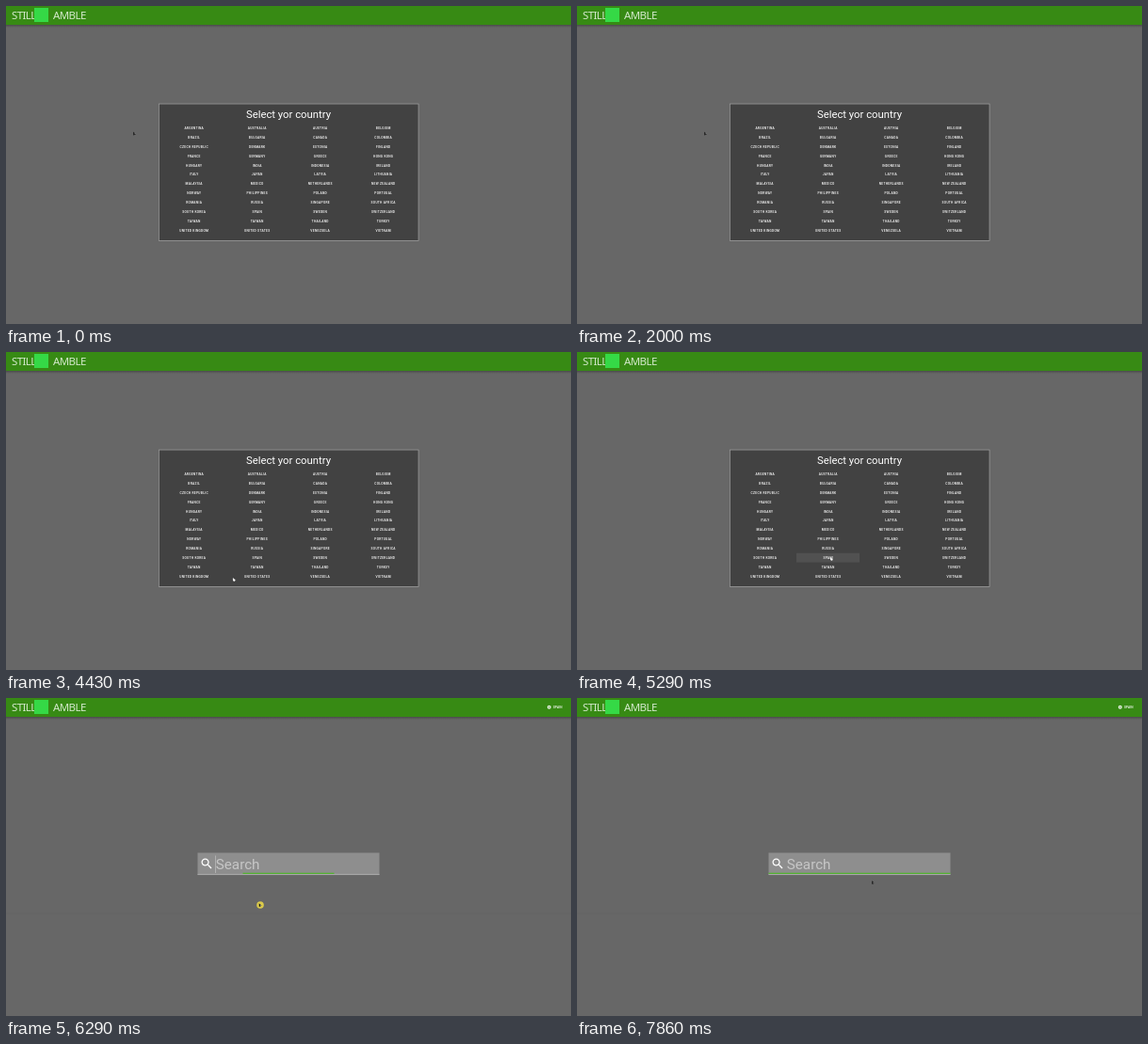
Write an HTML page with a canvas that moves like this. It is 600 by 338 pixels and loops after 8 s.

```html
<!DOCTYPE html>
<html lang="en">
<head>
<meta charset="utf-8">
<title>Country picker and search</title>
<style>
html, body { margin: 0; width: 100%; height: 100%; overflow: hidden; background: #666; }
canvas { display: block; width: 600px; height: 338px; }
</style>
</head>
<body>
<canvas id="stage" width="600" height="338"></canvas>
<script>
const ctx = document.getElementById('stage').getContext('2d');
const LOOP = 8000, FPS = 7;
const SWITCH = 6285;
const ROW_H = 9.86, COL_W = 67;

const countries = `ARGENTINA,AUSTRALIA,AUSTRIA,BELGIUM,BRAZIL,BULGARIA,CANADA,COLOMBIA,
CZECH REPUBLIC,DENMARK,ESTONIA,FINLAND,FRANCE,GERMANY,GREECE,HONG KONG,
HUNGARY,INDIA,INDONESIA,IRELAND,ITALY,JAPAN,LATVIA,LITHUANIA,
MALAYSIA,MEXICO,NETHERLANDS,NEW ZEALAND,NORWAY,PHILIPPINES,POLAND,PORTUGAL,
ROMANIA,RUSSIA,SINGAPORE,SOUTH AFRICA,SOUTH KOREA,SPAIN,SWEDEN,SWITZERLAND,
TAIWAN,TAIWAN,THAILAND,TURKEY,UNITED KINGDOM,UNITED STATES,VENEZUELA,VIETNAM`
  .split(',').map(s => s.trim());

// Pointer path: time, x, y
const path = [
  [0, 136.5, 135.5], [3570, 136.5, 135.5], [3860, 172, 190], [4140, 220, 252],
  [4430, 242, 242], [4710, 258, 229], [5000, 270, 220], [6290, 270, 220],
  [6570, 292, 207], [7000, 314.5, 196], [LOOP, 314.5, 196]
];

const searchIcon = new Path2D('M15.5 14h-.79l-.28-.27C15.41 12.59 16 11.11 16 9.5 16 5.91 13.09 3 9.5 3S3 5.91 3 9.5 5.91 16 9.5 16c1.61 0 3.09-.59 4.23-1.57l.27.28v.79l5 4.99L20.49 19l-4.99-5zm-6 0C7.01 14 5 11.99 5 9.5S7.01 5 9.5 5 14 7.01 14 9.5 11.99 14 9.5 14z');

const clamp = v => Math.max(0, Math.min(1, v));
const smooth = v => v * v * (3 - 2 * v);

function rect(x, y, w, h, color) {
  ctx.fillStyle = color;
  ctx.fillRect(x, y, w, h);
}

function disc(x, y, r, color) {
  ctx.fillStyle = color;
  ctx.beginPath();
  ctx.arc(x, y, r, 0, Math.PI * 2);
  ctx.fill();
}

function text(str, x, y, font, color, align = 'left', spacing = 0) {
  ctx.font = font;
  ctx.letterSpacing = spacing + 'px';
  ctx.textAlign = align;
  ctx.fillStyle = color;
  ctx.fillText(str, x, y);
}

function pointerAt(t) {
  const i = Math.max(1, path.findIndex(p => p[0] > t));
  const [t0, x0, y0] = path[i - 1], [t1, x1, y1] = path[i];
  const k = (t - t0) / (t1 - t0);
  return [x0 + (x1 - x0) * k, y0 + (y1 - y0) * k];
}

function header(picked) {
  const shade = ctx.createLinearGradient(0, 20, 0, 23);
  shade.addColorStop(0, 'rgba(0,0,0,.28)');
  shade.addColorStop(1, 'rgba(0,0,0,0)');
  rect(0, 20, 600, 3, shade);
  rect(0, 0, 600, 20, '#378a14');
  const font = "200 extra-condensed 11.5px 'Noto Sans', sans-serif";
  text('STILL', 6, 13.7, font, '#d3e8ca', 'left', -0.6);
  rect(30, 2, 15, 15, '#35d946');
  text('AMBLE', 50, 13.7, font, '#d3e8ca', 'left', -0.6);
  if (picked) {
    disc(576.8, 9.8, 2, '#e4f0df');
    disc(576.8, 9.8, 0.8, '#6fa857');
    text('SPAIN', 581, 11, "500 3.28px Roboto, sans-serif", '#fff', 'left', 0.1);
  }
}

function picker(t) {
  rect(162, 103.7, 276.4, 146, '#a2a2a2');
  rect(162.7, 104.4, 275, 144.6, '#424242');
  text('Select yor country', 300, 118.8, "400 11.3px Roboto, sans-serif", '#fff', 'center');
  const hover = clamp((t - 4700) / 280);
  if (hover) rect(233, 213.7, COL_W, ROW_H, `rgba(255,255,255,${0.08 * hover})`);
  countries.forEach((name, i) => {
    const x = 199.7 + (i % 4) * COL_W, y = 131.1 + Math.floor(i / 4) * ROW_H;
    text(name, x, y, "500 3.28px Roboto, sans-serif", '#fff', 'center', 0.29);
  });
}

function search(t) {
  const age = t - SWITCH;
  rect(0, 228.5, 600, 1, 'rgba(0,0,0,.05)');
  rect(203.5, 164.5, 193, 23.7, '#8e8e8e');
  rect(203.5, 187, 193, 1, '#a9a9a9');
  const half = 96.5 * smooth(clamp(0.5 + age / 400));
  rect(300 - half, 185.8, half * 2, 1.2, '#4fb02c');

  ctx.save();
  ctx.translate(205.6, 168.5);
  ctx.scale(0.629, 0.629);
  ctx.fillStyle = '#fff';
  ctx.fill(searchIcon);
  ctx.restore();

  text('Search', 222.8, 181.6, "400 15.2px Roboto, sans-serif", '#c6c6c6');
  if (Math.floor(age / 500) % 2 === 0) rect(222.3, 167.5, 0.6, 18.5, '#c9c9c9');
}

function pointer(t) {
  const [x, y] = pointerAt(t);
  if (t >= 5990 && t < SWITCH) disc(x, y, 5.5, '#f2d43a');
  else if (t >= SWITCH && t < 6420) disc(x, y, 3.8, 'rgba(240,220,70,.85)');
  const hand = t > 3900 && t < SWITCH;
  if (hand) {
    disc(x + 0.4, y + 0.3, 1.7, 'rgba(40,40,40,.5)');
    rect(x - 1, y - 1.7, 0.9, 2.4, '#fff');
    disc(x + 0.4, y + 0.5, 1.2, '#fff');
  } else {
    ctx.fillStyle = '#151515';
    ctx.beginPath();
    ctx.moveTo(x - 1.3, y - 1.8);
    ctx.lineTo(x + 1.6, y + 0.7);
    ctx.lineTo(x - 1.2, y + 1.9);
    ctx.fill();
    disc(x + 0.5, y + 0.2, 0.5, '#ccc');
  }
}

function draw(now) {
  const step = Math.floor((now % LOOP + 5) * FPS / 1000);
  const t = Math.min(step * 1000 / FPS, LOOP - 1);
  const picked = t >= SWITCH;
  rect(0, 0, 600, 338, '#676767');
  header(picked);
  if (picked) search(t);
  else picker(t);
  pointer(t);
  requestAnimationFrame(tick);
}

const start = performance.now();
function tick() {
  draw(performance.now() - start);
}
tick();
</script>
</body>
</html>
```
